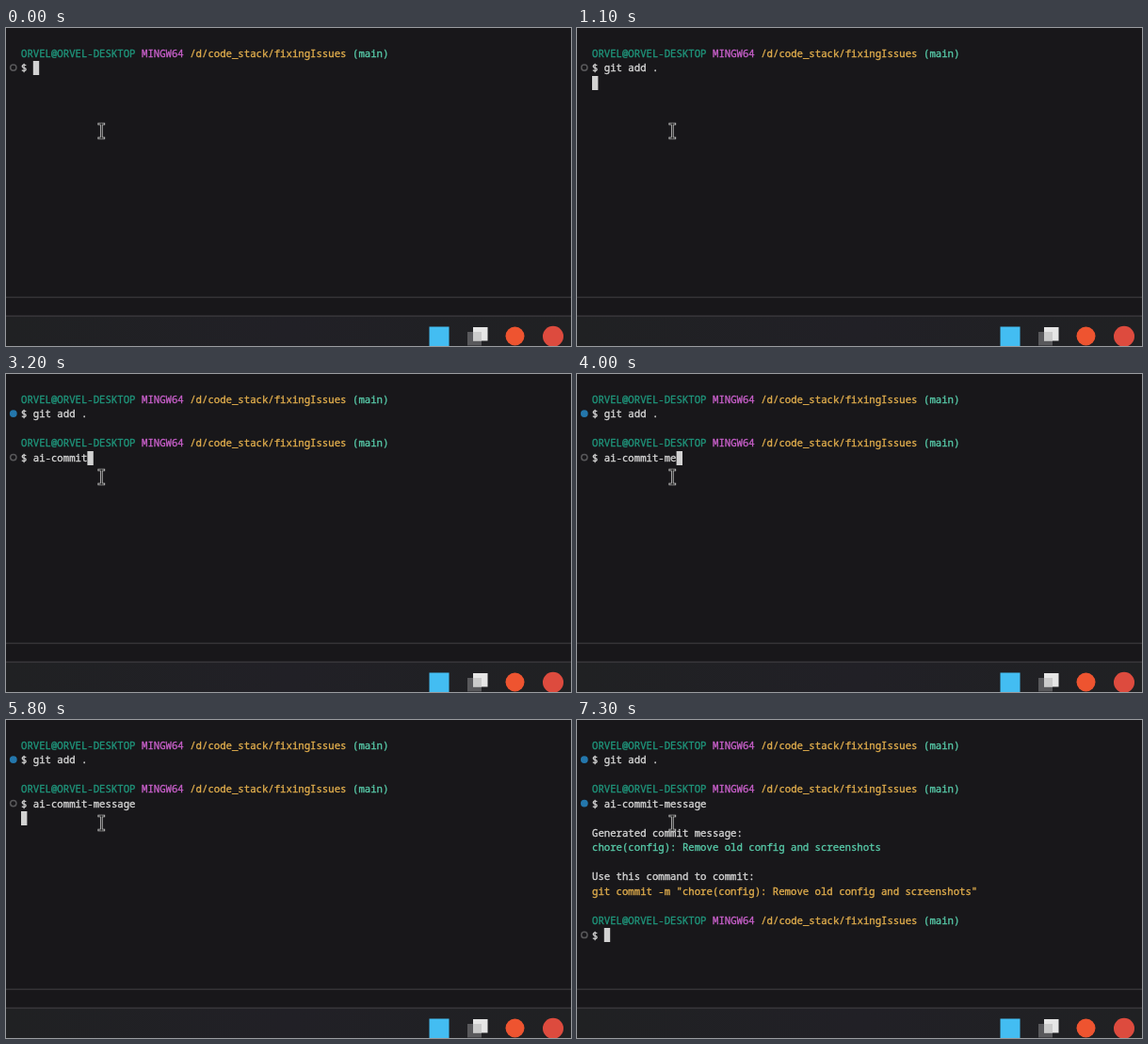
Animation, 600 px wide and 338 px high, one loop 7.6 s. Source, as an HTML page with a canvas:

```html
<!DOCTYPE html>
<html lang="en">
<head>
<meta charset="utf-8">
<title>Terminal session</title>
<style>
  html, body { margin: 0; width: 100%; height: 100%; overflow: hidden; background: #18171a; }
  canvas { display: block; width: 600px; height: 338px; }
</style>
</head>
<body>
<canvas id="stage" width="600" height="338"></canvas>
<script>
const ctx = document.getElementById('stage').getContext('2d');

const LOOP = 7600;
const LEFT = 16, CELL = 6.4, FIRST_ROW = 26.7, ROW = 15.53;
const COLOR = {
  back: '#18171a', text: '#d6d6d6', user: '#1f957b', system: '#c75fc9',
  path: '#dfac4c', branch: '#57c9a8', cursor: '#d2d2d2',
  ring: '#58585a', done: '#2477ac'
};

// Each entry of times is the moment the matching character appears.
const ADD = { text: 'git add .', times: [100, 200, 300, 400, 600, 700, 800, 900, 1000] };
const COMMIT = {
  text: 'ai-commit-message',
  times: [2100, 2100, 2200, 2400, 2600, 2700, 2900, 3000, 3100, 3500, 3800,
          4000, 4100, 4200, 4300, 4400, 4500]
};
const ADD_ENTER = 1100, ADD_DONE = 1200;
const COMMIT_ENTER = 5600, OUTPUT = 7200, COMMIT_DONE = 7300;
const MESSAGE = 'chore(config): Remove old config and screenshots';

const rowY = row => FIRST_ROW + row * ROW;
const typed = (command, t) => command.text.slice(0, command.times.filter(at => t >= at).length);

function rect(x, y, w, h, color) {
  ctx.fillStyle = color;
  ctx.fillRect(x, y, w, h);
}

function disc(x, y, r, color) {
  ctx.fillStyle = color;
  ctx.beginPath();
  ctx.arc(x, y, r, 0, Math.PI * 2);
  ctx.fill();
}

// A hairline outline gives the letters their slightly heavy stems.
function write(text, col, row, color = COLOR.text) {
  const x = LEFT + col * CELL, y = rowY(row) + 4;
  ctx.fillStyle = ctx.strokeStyle = color;
  ctx.lineWidth = 0.35;
  ctx.lineJoin = 'round';
  ctx.fillText(text, x, y);
  ctx.strokeText(text, x, y);
}

function cursor(col, row) {
  rect(LEFT + col * CELL, Math.round(rowY(row) - 7.2), CELL, 15, COLOR.cursor);
}

function prompt(row, input, done) {
  write('ORVEL@ORVEL-DESKTOP', 0, row, COLOR.user);
  write('MINGW64', 20, row, COLOR.system);
  write('/d/code_stack/fixingIssues', 28, row, COLOR.path);
  write('(main)', 55, row, COLOR.branch);
  write('$ ' + input, 0, row + 1);

  const y = rowY(row + 1) - 0.2;
  if (done) {
    disc(7.8, y, 3.9, COLOR.done);
  } else {
    disc(7.8, y, 3.9, COLOR.ring);
    disc(7.8, y, 2.4, COLOR.back);
  }
}

function taskbar() {
  rect(0, 285.6, 600, 1.2, '#3b3a3c');
  const shade = ctx.createLinearGradient(0, 0, 600, 0);
  shade.addColorStop(0, '#202123');
  shade.addColorStop(0.5, '#212026');
  shade.addColorStop(1, '#202123');
  rect(0, 306, 600, 32, shade);
  rect(0, 305.5, 600, 1.2, '#3e3d40');

  rect(449.5, 317.5, 21, 20.5, '#43bdf2');
  rect(490, 323, 15, 14.5, '#59595c');
  rect(496, 318, 15.5, 14.5, '#e6e6e6');
  rect(496, 323, 9, 9.5, '#cbcbcb');
  disc(540.5, 327.5, 10, '#ee5430');
  disc(581, 327.8, 11, '#dd4b3e');
}

function pointer() {
  const beam = (width, color) => {
    ctx.strokeStyle = color;
    ctx.lineWidth = width;
    ctx.lineCap = 'square';
    ctx.beginPath();
    for (const y of [102, 117]) {
      ctx.moveTo(98.8, y);
      ctx.lineTo(103.8, y);
    }
    ctx.moveTo(101.3, 102);
    ctx.lineTo(101.3, 117);
    ctx.stroke();
  };
  beam(2.7, '#c6c6c6');
  beam(1, '#111');
}

function cursorCell(t) {
  if (t < ADD_ENTER) return [2 + typed(ADD, t).length, 1];
  if (t < ADD_DONE) return [0, 2];
  if (t < COMMIT_ENTER) return [2 + typed(COMMIT, t).length, 4];
  if (t < OUTPUT) return [0, 5];
  return t < COMMIT_DONE ? [0, 11] : [2, 13];
}

function draw(t) {
  rect(0, 0, 600, 338, COLOR.back);
  taskbar();
  ctx.font = '10.667px "Noto Sans Mono", monospace';

  prompt(0, typed(ADD, t), t >= ADD_DONE);
  if (t >= ADD_DONE) prompt(3, typed(COMMIT, t), t >= COMMIT_DONE);
  if (t >= OUTPUT) {
    write('Generated commit message:', 0, 6);
    write(MESSAGE, 0, 7, COLOR.branch);
    write('Use this command to commit:', 0, 9);
    write(`git commit -m "${MESSAGE}"`, 0, 10, COLOR.path);
  }
  if (t >= COMMIT_DONE) prompt(12, '', false);

  cursor(...cursorCell(t));
  pointer();
}

const start = performance.now();
function tick() {
  draw((performance.now() - start) % LOOP);
  requestAnimationFrame(tick);
}
tick();
</script>
</body>
</html>
```
